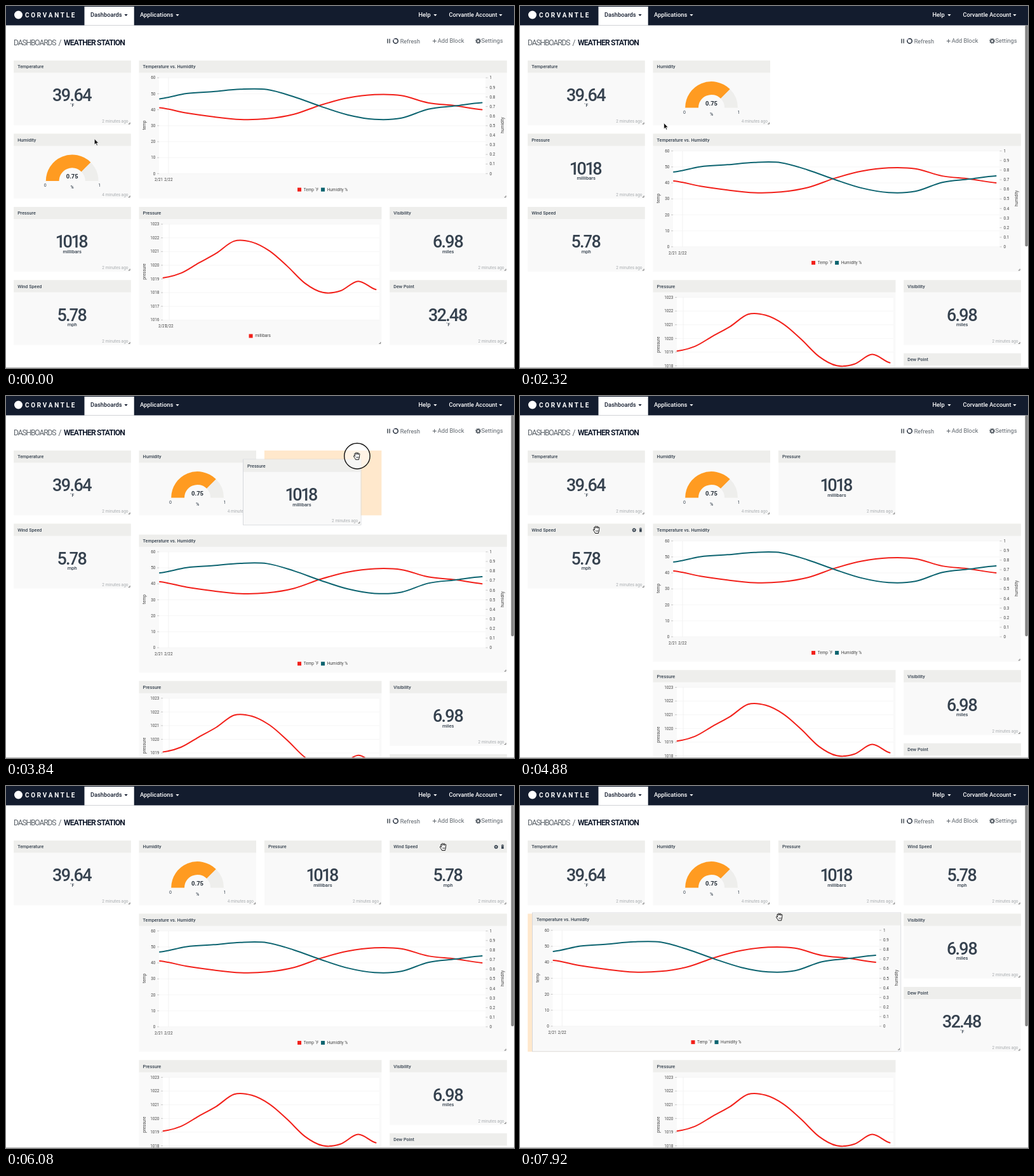
An HTML page that plays this animation: 800 px wide and 571 px high, repeating every 8 s.

```html
<!DOCTYPE html>
<html lang="en">
<head>
<meta charset="utf-8">
<title>Weather dashboard</title>
<style>
  html, body { margin: 0; width: 100%; height: 100%; overflow: hidden; background: #fff; }
  svg { display: block; width: 100%; height: 100%; font-family: Roboto, "Open Sans", sans-serif; }
  #slot { mix-blend-mode: multiply; }
  .value { font-weight: 500; letter-spacing: -1.75px; font-variant-numeric: proportional-nums; }
</style>
</head>
<body>
<svg id="stage" viewBox="0 0 800 571"></svg>
<script>
const LOOP = 8000;
const SETTLE = 300;  // time for a block to slide into its cell
const LEAD = 80;     // the pointer runs ahead of the block it drags
const GRIP = 160;    // pause between pressing and moving
const INK = '#131c2e', DARK = '#36424f', GREY = '#5d646b', RED = '#f2201a', TEAL = '#0d6470';
const stage = document.getElementById('stage');

// ---- drawing helpers ----
const text = (x, y, s, size, fill = DARK, extra = '') =>
  `<text x="${x}" y="${y}" font-size="${size}" fill="${fill}" ${extra}>${s}</text>`;
const rect = (x, y, w, h, fill, extra = '') =>
  `<rect x="${x}" y="${y}" width="${w}" height="${h}" fill="${fill}" ${extra}/>`;
const path = (d, stroke, width, extra = '') =>
  `<path d="${d}" fill="none" stroke="${stroke}" stroke-width="${width}" ${extra}/>`;
const repeat = (n, draw) => Array.from({ length: n }, (_, i) => draw(i)).join('');
const bold = w => ` font-weight="${w}" `;
const MID = 'text-anchor="middle"', END = 'text-anchor="end"';
const caret = (x, fill) => `<path d="M${x - 2.6} 13h5.2l-2.6 3z" fill="${fill}"/>`;
const gear = (x, y, r, fill) =>
  `<circle cx="${x}" cy="${y}" r="${r * .62}" fill="none" stroke="${fill}" stroke-width="${r * .5}"/>` +
  `<circle cx="${x}" cy="${y}" r="${r * .9}" fill="none" stroke="${fill}" stroke-width="${r * .35}" stroke-dasharray="${r * .353}"/>`;

// Smooth line through evenly spaced values
function series(values, x0, x1, toY, color) {
  const step = (x1 - x0) / (values.length - 1);
  const y = i => toY(values[Math.max(0, Math.min(values.length - 1, i))]);
  let d = `M${x0} ${y(0)}`;
  for (let i = 0; i < values.length - 1; i++) {
    const x = x0 + i * step;
    d += `C${x + step / 3} ${y(i) + (y(i + 1) - y(i - 1)) / 6} ` +
         `${x + step * 2 / 3} ${y(i + 1) - (y(i + 2) - y(i)) / 6} ${x + step} ${y(i + 1)}`;
  }
  return path(d, color, 2, 'stroke-linecap="round"');
}

// ---- grid geometry ----
const cellPoint = ([, col, row]) => [12.2 + col * 197.35, 86 + row * 115.45];
const spanW = n => n * 197.35 - 12.85, spanH = n => n * 115.45 - 13.2;

function block(title, cols, rows, body, age) {
  const w = spanW(cols), h = spanH(rows);
  return rect(-.5, -.5, w + 1, h + 1, 'none', 'class="edge" stroke="#d6d8dc"') +
    rect(0, 0, w, h, '#f9f9f9') + rect(0, 0, w, 19.2, '#eeeeec') +
    text(6, 12.4, title, 7.2, DARK, bold(500)) + body +
    (age ? text(180.3, 98.4, age + ' minutes ago', 6.5, '#a9adb0', END) : '') +
    path(`M${w - 4} ${h - 2.2}H${w - 1.6}V${h - 4.6}`, '#777', 1) +
    `<g class="tools">${gear(w - 17, 10, 3, DARK)}` +
    path(`M${w - 9} 7.6h4.4M${w - 7.6} 7.4v-.7h1.6v.7`, DARK, .8) + rect(w - 8.6, 8.4, 3.6, 4.6, DARK) + '</g>';
}
const number = (value, unit, size = 7.6) =>
  text(91.2, 64.4, value, 27, DARK, MID + ' class="value"') + text(92, 73, unit, size, DARK, MID + bold(500));

function gauge(value) {
  const x = 92, y = 74.5, R = 41.4, r = 20.6;
  const at = (radius, v) => `${x - radius * Math.cos(Math.PI * v)} ${y - radius * Math.sin(Math.PI * v)}`;
  const arc = (a, b, fill) =>
    `<path d="M${at(R, a)}A${R} ${R} 0 0 1 ${at(R, b)}L${at(r, b)}A${r} ${r} 0 0 0 ${at(r, a)}z" fill="${fill}"/>`;
  return arc(0, value, '#ff9b21') + arc(value, 1, '#eeeeec') +
    text(x, 70.8, value, 9.4, '#222b35', MID + bold(700)) +
    text(49.5, 84, '0', 7, DARK, MID) + text(135, 84, '1', 7, DARK, MID) +
    text(x, 86.5, '%', 7, DARK, MID + bold(500));
}

// ---- charts ----
const TOP = 27.2, PLOT = 151.2;
const label = (x, y, s, anchor) => text(x, y + 2.2, s, 6.3, '#444', anchor);
const axisName = (x, s) =>
  `<text transform="translate(${x} 102) rotate(-90)" ${MID} font-size="6.6" fill="#444">${s}</text>`;
const legend = (x, color, s) => rect(x, 200.6, 6, 6, color) + text(x + 9.6, 205.6, s, 6.5, '#444');
const scale = (min, max) => v => TOP + .4 + PLOT * (max - v) / (max - min);

function plot(x, w, max, stepSize, count, name) {
  return rect(x, TOP, w, PLOT, '#fff') +
    repeat(count, i => {
      const y = TOP + PLOT * i / (count - 1);
      return path(`M${x} ${y}h${w}`, '#f2f2f2', .7) + path(`M${x} ${y}h-3`, '#bbb', .8) +
        label(x - 5.7, y, max - i * stepSize, END);
    }) + axisName(10, name);
}
const dates = (x, gap) => path(`M${x} ${TOP}v${PLOT}`, '#eee', .8) +
  label(x - gap, 188, '2/21', MID) + label(x, 188, '2/22', MID);

function comboChart() {
  const temp = [41.4, 38.1, 35.7, 34, 34.5, 37.3, 43.1, 47.5, 49.6, 49, 44.5, 42.7, 40.2];
  const humidity = [.783, .838, .859, .883, .88, .804, .704, .616, .569, .582, .675, .709, .743];
  const rightAxis = repeat(11, i => {
    const y = TOP + PLOT * i / 10;
    return path(`M546 ${y}h3`, '#bbb', .8) + label(552, y, +(1 - i / 10).toFixed(1));
  });
  return plot(31.5, 514, 60, 10, 7, 'temp') + rightAxis + axisName(574.5, 'humidity') + dates(46.3, 15.3) +
    series(temp, 32.5, 540, scale(0, 60), RED) + series(humidity, 32.5, 540, scale(0, 1), TEAL) +
    legend(249.5, RED, 'Temp ˚F') + legend(286.5, TEAL, 'Humidity %');
}
function pressureChart() {
  const hundredths = [310, 344, 418, 490, 578, 571, 506, 395, 270, 203, 215, 285, 224];
  return plot(37.5, 341, 1023, 1, 8, 'pressure') + dates(47.5, 10.5) +
    series(hundredths, 38, 373, scale(0, 700), RED) + legend(173, RED, 'millibars');
}

// ---- layout: cells are [time, column, row] ----
// Rows by which the charts are pushed down, over time
const pushes = [[0, 0], [1200, 1], [3080, 2], [3700, 1], [5300, 2], [5500, 1]];
const pushed = (col, row) => pushes.map(([t, n]) => [t, col, row + n]);
const small = (title, value, unit, cells, size) =>
  ({ cols: 1, rows: 1, cells, body: block(title, 1, 1, number(value, unit, size), 2) });
const widgets = {
  temp: small('Temperature', '39.64', '˚F', [[0, 0, 0]], 7),
  humid: { cols: 1, rows: 1, cells: [[0, 0, 1]], body: block('Humidity', 1, 1, gauge(.75), 4) },
  press: small('Pressure', '1018', 'millibars', [[0, 0, 2], [1200, 0, 1]]),
  wind: small('Wind Speed', '5.78', 'mph', [[0, 0, 3], [1200, 0, 2], [3080, 0, 1]]),
  combo: { cols: 3, rows: 2, cells: pushed(1, 0), body: block('Temperature vs. Humidity', 3, 2, comboChart()) },
  line: { cols: 2, rows: 2, cells: pushed(1, 2), body: block('Pressure', 2, 2, pressureChart()) },
  vis: small('Visibility', '6.98', 'miles', [...pushed(3, 2), [7200, 3, 1]]),
  dew: small('Dew Point', '32.48', '˚F', [...pushed(3, 3), [7200, 3, 2]], 7)
};

// ---- drags: steps are [time, x, y] of the block, grab is the pointer's place on it ----
const drags = [
  { id: 'humid', grab: [127, 8], steps: [[960, 12.2, 201.4], [1300, 128, 201], [1520, 139, 139], [1680, 209.5, 86]],
    slots: [[960, 0, 1], [1200, 1, 2], [1600, 1, 0]] },
  { id: 'press', grab: [150, 7], steps: [[2720, 12.2, 201.4], [3340, 144, 203], [3440, 148, 201], [3960, 406.9, 86]],
    slots: [[2720, 0, 1], [3080, 1, 1], [3700, 2, 0]] },
  { id: 'wind', grab: [85, 9.5], steps: [[5140, 12.2, 201.4], [5760, 604.2, 86]],
    slots: [[5140, 0, 1], [5300, 1, 1], [5500, 3, 0]] },
  { id: 'combo', grab: [389, 6], steps: [[6860, 209.5, 201.4], [7120, 129.6, 201], [7600, 20, 200.5]],
    slots: [[6860, 1, 1], [7200, 0, 1]] }
];
for (const d of drags) {
  const steps = d.steps, slot = d.slots[d.slots.length - 1];
  d.start = steps[0][0];
  d.up = steps[steps.length - 1][0] + LEAD;
  d.drop = d.up - LEAD + SETTLE;
  if (d.id === 'combo') d.drop = LOOP;
  else widgets[d.id].cells.push([d.drop, slot[1], slot[2]]);
}

const clamp = p => Math.max(0, Math.min(1, p));
const smooth = p => clamp(p) ** 2 * (3 - 2 * clamp(p));
const current = (keys, t) => keys.filter(k => k[0] <= t).pop();
const add = (a, b) => a.map((v, i) => v + b[i]);
const mix = (a, b, p) => a + (b - a) * p;

// Monotone cubic through timed keys
function track(keys, t, axis) {
  const last = keys.length - 1;
  if (t <= keys[0][0]) return keys[0][axis];
  if (t >= keys[last][0]) return keys[last][axis];
  const i = keys.findIndex(k => k[0] > t) - 1;
  const slope = j => j < 0 || j >= last ? 0 : (keys[j + 1][axis] - keys[j][axis]) / (keys[j + 1][0] - keys[j][0]);
  const tangent = j => { const a = slope(j - 1), b = slope(j); return a * b > 0 ? 2 * a * b / (a + b) : 0; };
  const h = keys[i + 1][0] - keys[i][0], p = (t - keys[i][0]) / h, q = 1 - p;
  return mix(keys[i][axis], keys[i + 1][axis], smooth(p)) + h * p * q * (tangent(i) * q - tangent(i + 1) * p);
}
const point = (keys, t) => [track(keys, t, 1), track(keys, t, 2)];

// A block in the grid slides from its previous cell, or rests where it was dropped
function place(id, t) {
  const cells = widgets[id].cells, cell = current(cells, t), to = cellPoint(cell);
  const dropped = drags.some(d => d.id === id && d.drop === cell[0]);
  const before = cells[cells.indexOf(cell) - 1];
  if (!before || dropped) return to;
  const rest = (1 - clamp((t - cell[0]) / SETTLE)) ** 3;
  return cellPoint(before).map((v, k) => mix(to[k], v, rest));
}

// The pointer leads each drag, then travels to the next grip
function pointerAt(t) {
  const n = drags.findIndex(d => t < d.drop), next = drags[n], prev = drags[n - 1];
  const to = add(point(next.steps, t + (t < next.start - LEAD ? 0 : LEAD)), next.grab);
  if (!prev || t >= next.start - GRIP) return to;
  const from = add(point(prev.steps, prev.drop), prev.grab);
  const p = (t - prev.drop) / (next.start - GRIP - prev.drop);
  return [mix(from[0], to[0], smooth(p)), mix(from[1], to[1], smooth(p * 1.2))];
}

// ---- page ----
const nav = rect(0, 0, 800, 30.5, INK) + rect(123.5, 1, 78.2, 29.6, '#fff') +
  '<circle cx="19.5" cy="14" r="6.5" fill="#fff"/>' +
  text(30, 17.8, 'CORVANTLE', 10, '#fff', bold(700) + 'letter-spacing="2.7"') +
  text(133, 17.2, 'Dashboards', 9.25, INK, bold(500)) + caret(189, INK) +
  text(211, 17.2, 'Applications', 9.4, '#fff', bold(500)) + caret(270, '#fff') +
  text(649.5, 17.2, 'Help', 9.3, '#fff', bold(500)) + caret(676, '#fff') +
  text(697.5, 17.2, 'Corvantle Account', 9.2, '#fff', bold(500)) + caret(779, '#fff');
const heading = text(12, 61.6, 'DASHBOARDS', 12.2, GREY, 'letter-spacing="-1.2"') + text(82.5, 61.6, '/', 12.2, GREY) +
  text(91, 61.6, 'WEATHER STATION', 12.2, INK, bold(700) + 'letter-spacing="-.85"') +
  path('M601 51.8v7M604.2 51.8v7', GREY, 1.7) +
  '<circle cx="613.6" cy="55.2" r="3.7" fill="none" stroke="#1d2735" stroke-width="1.5"/>' +
  path('M610.2 54a3.7 3.7 0 0 1 2-2.2', '#aab', 1.5) +
  text(620.7, 59, 'Refresh', 9.2, GREY) +
  path('M671.8 55.3h6M674.8 52.3v6', GREY, 1.1) + text(679.7, 58.4, 'Add Block', 9.3, GREY) +
  gear(743.6, 55.2, 4.1, GREY) + text(748.6, 58.4, 'Settings', 9.3, GREY);
const hand = '<path d="M-2.4 5.6C-3 3.4-5.4 1.5-5.5 0-5.4-1-4.2-.9-3.2.5L-4.2-3c-.2-1.3 1.2-1.6 1.7-.4l.4 1-.2-2.2c0-1.3 1.6-1.3 1.8 0l.3 1.9.4-1.9c.3-1.2 1.8-.9 1.7.3l-.2 2 .7-1.2c.7-1 1.8-.4 1.6.7C3.4-.6 4 2 2.9 3.6l-.3 2z" fill="#fff" stroke="#111" stroke-linejoin="round"/>' +
  path('M-1.1 1v2.2M.6 1v2.2M2.1 1v2', '#111', .7);
const arrow = '<path d="M0 0v9.4l2.2-2 1.5 3.4 1.5-.7-1.5-3.2h2.9z" fill="#111" stroke="#fff" stroke-width=".7"/>';

stage.innerHTML = rect(0, 0, 800, 571, '#fff') + heading +
  `<g id="grid">${Object.keys(widgets).map(id => `<g id="${id}">${widgets[id].body}</g>`).join('')}</g>` +
  `<g id="slot">${rect(0, 0, 1, 1, '#ffe8cc')}${rect(31.5, 0, 153, 63, '#ffe9ce')}</g>` +
  '<g id="lift"></g>' + nav + rect(795.4, 30, 4.4, 1, '#858585', 'id="thumb" rx="2"') +
  rect(0, 570, 800, 1, '#b4b4b4') +
  `<g id="pointer"><circle r="20.2" fill="#fff" fill-opacity=".5" stroke="#111" stroke-width="1.4"/><g>${hand}</g><g>${arrow}</g></g>`;

const el = id => document.getElementById(id);
const show = (node, on) => node.setAttribute('visibility', on ? 'visible' : 'hidden');
const move = (node, p) => node.setAttribute('transform', `translate(${p[0].toFixed(2)} ${p[1].toFixed(2)})`);
const grid = el('grid'), lift = el('lift'), slot = el('slot'), thumb = el('thumb'), pointer = el('pointer');
const [slotBox, slotPlot] = slot.children, [ring, handIcon, arrowIcon] = pointer.children;
for (const id in widgets) {
  const w = widgets[id];
  w.node = el(id);
  w.edge = w.node.querySelector('.edge');
  w.tools = w.node.querySelector('.tools');
}

function showSlot(drag, t) {
  show(slotBox, drag);
  show(slotPlot, false);
  if (!drag) return;
  const cell = current(drag.slots, t), w = widgets[drag.id], onChart = cell[2] === 2;
  move(slot, cellPoint(cell));
  slotBox.setAttribute('width', spanW(w.cols));
  slotBox.setAttribute('height', spanH(w.rows));
  slotBox.setAttribute('fill', onChart ? '#ffe6dc' : '#ffe8cc');
  show(slotPlot, onChart);
}

function render(t) {
  const drag = drags.find(d => t >= d.start && t < d.drop);
  const at = pointerAt(t);
  let hovered = false;
  for (const id in widgets) {
    const w = widgets[id], held = !!drag && drag.id === id;
    const p = held ? point(drag.steps, t) : place(id, t);
    const layer = held ? lift : grid;
    if (w.node.parentNode !== layer) layer.appendChild(w.node);
    move(w.node, p);
    const dx = at[0] - p[0], dy = at[1] - p[1];
    const over = !drag && t > 400 && dx > 0 && dx < spanW(w.cols) && dy > 0 && dy < 19;
    hovered = hovered || over;
    show(w.edge, held);
    show(w.tools, over);
  }
  showSlot(drag, t);

  // the page grows with the first push and the scrollbar shrinks to fit
  const grown = t - pushes[1][0];
  show(thumb, grown >= 0);
  thumb.setAttribute('height', 349 + 180 * Math.exp(-Math.max(0, grown) / 170));

  move(pointer, at);
  const useHand = !!drag || hovered;
  show(ring, drags.some(d => t >= d.start - GRIP && t < d.up));
  show(handIcon, useHand);
  show(arrowIcon, !useHand);
}

const start = performance.now();
function tick() {
  render((performance.now() - start) % LOOP);
  requestAnimationFrame(tick);
}
tick();
</script>
</body>
</html>
```
